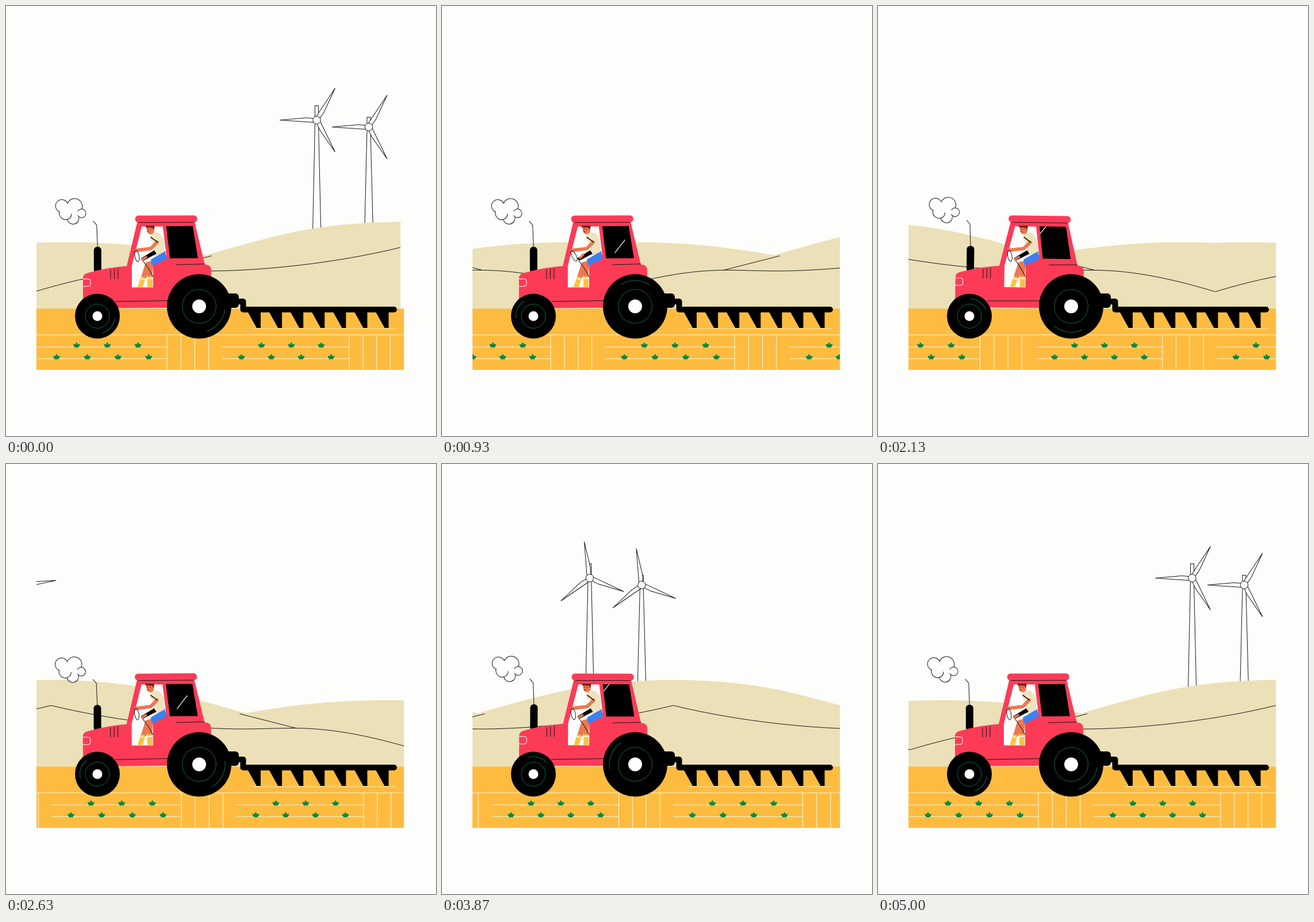
Recreate the animation shown at these times as an HTML page. Size 748 px wide and 748 px high, loop 5030 ms.

```html
<!DOCTYPE html>
<html lang="en">
<head>
<meta charset="utf-8">
<title>Tractor in the field</title>
<style>
  html, body { margin: 0; width: 100%; height: 100%; overflow: hidden; background: #fdfdfb; }
  svg { display: block; width: 100vw; height: 100vh; }
  .line { fill: none; stroke: #16161c; stroke-width: 1; }
  .outline { fill: #fdfdfb; stroke: #16161c; stroke-width: 1; }
  .furrow { fill: none; stroke: #fff3d2; stroke-width: 1.1; }
  .tread { fill: none; stroke: #0d6b42; stroke-width: 1; stroke-linecap: round; }
  .red { fill: #fd3b57; }
  .skin { fill: #ee7750; }
  .arm { fill: none; stroke: #ee7750; stroke-width: 6; stroke-linecap: round; stroke-linejoin: round; }
  .white { fill: #fefefe; }
</style>
</head>
<body>
<svg id="stage" viewBox="0 0 748 748"></svg>
<script>
const LOOP = 5030;
const HILL = { speed: 8.52, width: 1272, mirror: 100 };
const FIELD = { speed: 8.487, width: 637, start: 280 };

const range = n => [...Array(n).keys()];
const repeat = (n, draw) => range(n).map(draw).join('');
const at = (x, y, content) => `<g transform="translate(${x} ${y})">${content}</g>`;
const path = (d, attrs = '') => `<path d="${d}" ${attrs}/>`;
const line = d => path(d, 'class="line"');

function turbine(x, y, nacelle, foot) {
  const blade = a => path('M5 -4L64 0L18 4L6 3Z', `class="outline" transform="rotate(${a})"`);
  return at(x, y,
    path(`M-3 6L-7 ${foot}H7.3L3 6Z`, 'class="outline"') +
    `<rect class="outline" x="-3" y="${-nacelle}" width="6" height="${nacelle}"/>` +
    `<g class="rotor">${[60, 180, 300].map(blade).join('')}</g>` +
    '<circle class="outline" r="6.7"/>');
}

function hills() {
  const ridge = 'M49.5 412C90 410.5 130 410.5 170 412.5C240 416 300 425 348 433.5' +
    'C425 411 485 395 535 387C585 379 635 376 686.3 375.5V528H49.5Z';
  const half = path(ridge, 'fill="#ebe0b7"') +
    line('M50 497C120 476 190 460 260 459.5C300 459.5 320 461 360 461C470 459.5 590 443.5 686 420') +
    line('M260 459.5L358 434.5');
  const tile = turbine(540.5, 198.5, 25, 195) + turbine(631, 210.5, 17, 172) +
    half + `<g transform="translate(${HILL.mirror}) scale(-1 1)">${half}</g>`;
  return at(-HILL.width, 0, tile) + tile;
}

function plants(x, step) {
  const plant = (px, py) => path(
    `M${px - 6} ${py - 6}l3.7 0.6l2.3 -4l2.3 4l3.7 -0.6q-0.8 4.5 -3 6h-6q-2.2 -1.5 -3 -6z`,
    'fill="#0b8840"');
  return repeat(3, i => plant(x + 34.8 + i * step, 594)) +
    repeat(4, i => plant(x + i * step, 614.5));
}

function field() {
  const posts = (x, gap) => repeat(4, i => `M${x + i * gap} 572V633`);
  const rows = (x, end) => [593, 613.5].map(y => `M${x} ${y}H${end}`).join('');
  const tile = path(`M0 572H637${posts(0, 24.2)}${posts(317, 23.8)}${rows(96, 317)}${rows(412, 637)}`,
    'class="furrow"') + plants(129.5, 52) + plants(445, 53.4);
  return repeat(3, i => at(-i * FIELD.width, 0, tile));
}

function wheel(id, x, y, r, ring, track, hub) {
  const a = Math.PI / 5.5;
  const px = track * Math.cos(a), py = track * Math.sin(a);
  return at(x, y, `<circle r="${r}"/><circle class="tread" r="${ring}"/>` +
    `<g id="${id}">${path(`M${px} ${-py}A${track} ${track} 0 0 1 ${px} ${py}`, 'class="tread"')}</g>` +
    `<circle class="white" r="${hub}"/>`);
}

function driver() {
  return path('M244 383H258V393Q255 399 249 396.5Q244.5 394 244 383Z', 'class="skin"') +
    path('M243 382H259L257.5 390L255 386L243 385Z', 'fill="#7b2114"') +
    line('M247.5 387v2M246.5 392.5l3 0.5M252 388v2') +
    path('M243 446L254 443L244 474L235 472Z', 'class="skin"') +
    path('M246 446L257 444L254 472H246Z', 'class="skin"') +
    path('M235 470L243 472L238 489H229Z', 'fill="#ffc145"') +
    path('M246 470H255V489H246Z', 'fill="#ffc145"') +
    path('M234 474l8 2M246 474h9', 'stroke="#fff" stroke-width="1.5"') +
    line('M238 443L247 455L256 471') +
    path('M277 426L280 440L254 452L252 441Z', 'fill="#3f7ff2"') +
    path('M251 400Q262 390 269 397Q279 411 275 428L257 436Q261 415 251 406Z', 'fill="#ede3bd"') +
    path('M235 439L258 425L262 431L239 443Z') +
    path('M263 411L252 422L227 425', 'class="arm"') +
    '<g id="steer">' +
    path('M244 437L237 441', 'class="arm" style="stroke-width:4"') +
    '<ellipse class="line" cx="228" cy="435" rx="3.7" ry="10" transform="rotate(-10 228 435)"/></g>' +
    path('M252 402L264 411', 'stroke="#111" stroke-width="1.6"');
}

function cloud() {
  return path('M94 358A11 11 0 1 1 107.5 343A13 13 0 0 1 132 353A8 8 0 1 1 125 364' +
      'L127 368A10 10 0 0 1 107 371A12.5 12.5 0 0 1 94 358', 'class="white"') +
    line('M94 358A11 11 0 1 1 107.5 343A13 13 0 0 1 132 353') +
    line('M125 364A7.6 7.6 0 1 0 125 357') +
    line('M93 357C92 368 100 373 107 371Q115 368 114 361M107 371A10 10 0 0 0 127 367');
}

function body() {
  return cloud() + line('M152 374L158 381L159.5 420') +
    '<rect x="153" y="418.5" width="13" height="46" rx="6"/>' +
    path('M134 525.5V473Q134 466 143 464Q178 454 217 452L229 376H328L346 450Q357 450 357 460V500L285 525Z',
      'class="red"') +
    path('M210 453L229 374H328L346 453Z', 'class="red"') +
    path('M236.5 383.5H273L279 433L256 444V489.5H219V452Z', 'class="white"') +
    driver() +
    path('M279 383H325L334 439H285.5Z') +
    '<g clip-path="url(#window)"><path id="glint" d="M9 -11.5L-9 11.5" stroke="#fff" stroke-width="1.2"/></g>' +
    '<rect class="red" x="225" y="364.5" width="108" height="12" rx="5.5"/>' +
    line('M231 376.5H327M296 450L346 449M190 514L282 512.5M182 458v17M188.5 457v18M195 456v19') +
    path('M134 474.5H142Q147 474.5 147 479V483Q147 487.5 142 487.5H134',
      'fill="none" stroke="#fff" stroke-width="1"');
}

function plough() {
  const tooth = i => `M${421 + i * 37.1} 533h22v27h-7z`;
  return '<rect x="380" y="500" width="25" height="25" rx="6"/>' +
    path('M400 514H412.5V528H675', 'fill="none" stroke="#000" stroke-width="10" stroke-linecap="round" stroke-linejoin="round"') +
    path(repeat(7, tooth)) +
    path('M428 561.5H679', 'stroke="#ffe3a0" stroke-width="1"');
}

const stage = document.getElementById('stage');
stage.innerHTML =
  `<defs><clipPath id="view"><rect x="53" y="100" width="639.3" height="533"/></clipPath>
   <clipPath id="window"><path d="M279 383H325L334 439H285.5Z"/></clipPath></defs>
   <g clip-path="url(#view)">
     <g id="hills">${hills()}</g>
     <rect x="53" y="526.5" width="640" height="107" fill="#fdbc40"/>
     <g id="field">${field()}</g>
   </g>` +
  plough() + `<g id="body">${body()}</g>` +
  wheel('rear', 336, 522.5, 56, 29.5, 45, 12) +
  wheel('front', 159, 539.5, 39, 21, 30.5, 8.5);

const part = Object.fromEntries(
  ['hills', 'field', 'body', 'rear', 'front', 'glint', 'steer'].map(id => [id, document.getElementById(id)]));
const rotors = stage.querySelectorAll('.rotor');
const place = (node, value) => node.setAttribute('transform', value);

// Motion advances on a 30 fps grid; the middle step of each 100 ms holds.
const frameAt = t => 3 * Math.floor(t / 100) + (t % 100 < 70 ? 0 : 2);

function render(t) {
  const n = frameAt(t);
  place(part.hills, `translate(${HILL.speed * n})`);
  place(part.field, `translate(${FIELD.start + (FIELD.speed * n) % FIELD.width})`);
  rotors.forEach(rotor => place(rotor, `rotate(${-2.4 * n})`));
  place(part.rear, `rotate(${40 - 4.8 * n})`);
  place(part.front, `rotate(${40 - 7.2 * n})`);

  const tilt = 0.25 + 0.6 * Math.cos((n - 3.5) * Math.PI / 5);
  place(part.body, `rotate(${tilt} 255 524)`);

  const sweep = n % 53 - 24;
  place(part.glint, `translate(${305.5 + 1.4 * sweep} ${413 + 1.75 * sweep})`);

  const turn = Math.exp(-(((n - 27) / 9) ** 2));
  place(part.steer, `rotate(${-16 * turn} 228 428)`);
}

function tick() {
  render(performance.now() % LOOP);
  requestAnimationFrame(tick);
}
tick();
</script>
</body>
</html>
```
